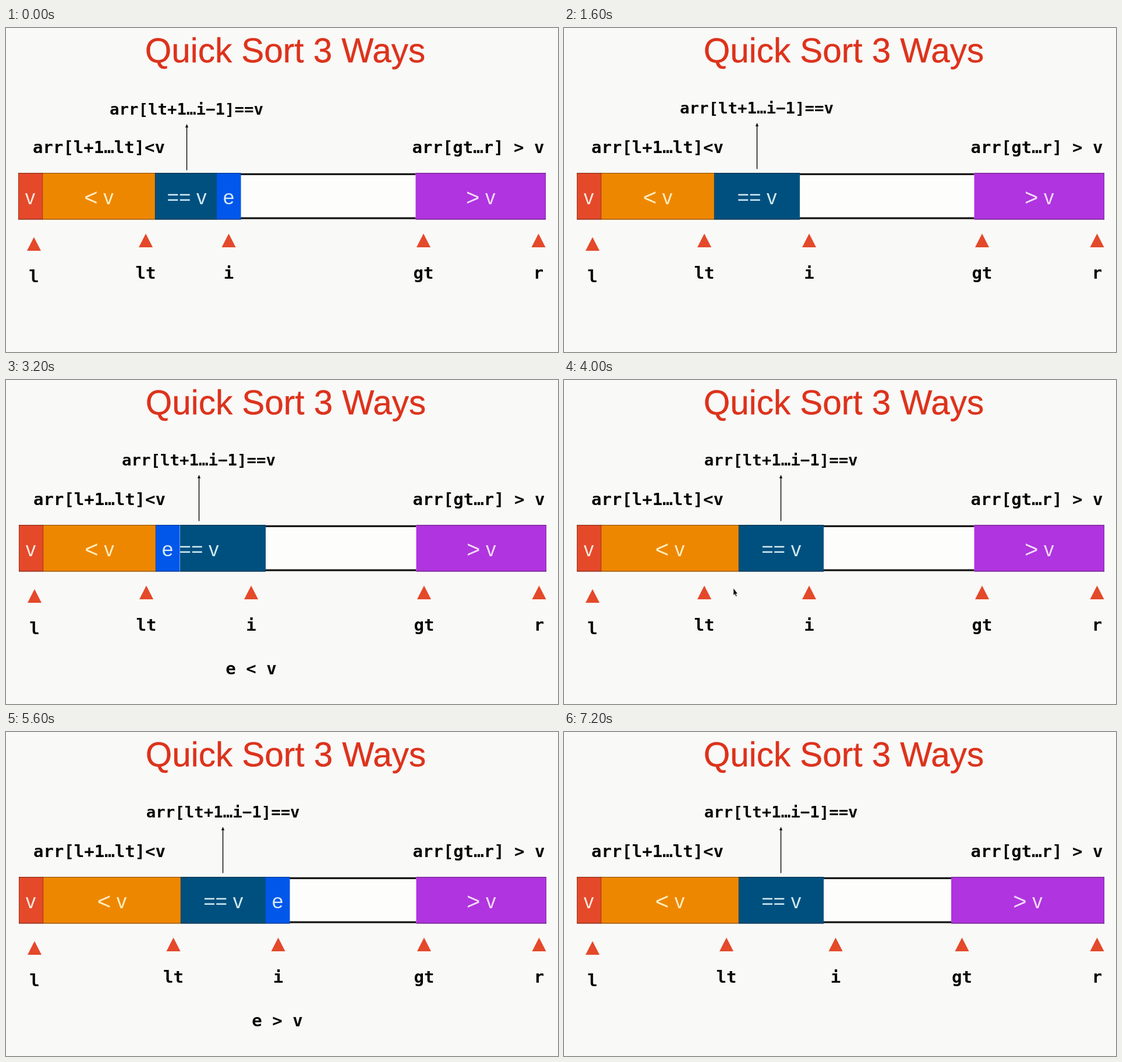
These frames come from a looping animation (948x557 px, 8000 ms). An HTML page:

```html
<!DOCTYPE html>
<html lang="en">
<head>
<meta charset="utf-8">
<title>Quick Sort 3 Ways</title>
<style>
html, body { margin: 0; width: 100%; height: 100%; overflow: hidden; background: #f9f9f7; }
svg { display: block; width: 948px; height: 557px; }
text { text-anchor: middle; white-space: pre; }
.title { font: 58.4px "Liberation Sans", Arial, sans-serif; fill: #dd321c; stroke: #dd321c; stroke-width: .4px; }
.code { font: bold 29px "DejaVu Sans Mono", monospace; fill: #060606; }
.small { font-size: 27.4px; }
.cell { font: 35px "Liberation Sans", Arial, sans-serif; }
.sign { font-size: 40px; }
</style>
</head>
<body>
<svg id="stage" viewBox="0 0 948 557"></svg>
<script>
const stage = document.getElementById("stage");
const STEP = 800;
const RED = "#e4492a", ORANGE = "#ee8700", TEAL = "#00507f", BLUE = "#0057ea", PURPLE = "#b034df";

// lt, i, gt: pointers; less, equal, more: section edges; e: left edge of the current cell
const base = { dx: 0, lt: 241, i: 383.5, gt: 718, less: 257, start: 257, equal: 363, more: 704.5,
  mid: 311, rise: 0, e: null, fill: BLUE, note: "", noteX: 0 };
const grown = { ...base, i: 421, less: 258, start: 258, equal: 405, mid: 331, rise: 2 };
const shifted = { ...grown, less: 300, start: 300, equal: 446, mid: 372.7 };
const moved = { ...shifted, lt: 287.5, i: 467.5 };
const states = [
  { ...base, dx: -1, e: 363 },
  { ...base, e: 363, fill: TEAL, note: "e == v", noteX: 384 },
  grown,
  { ...grown, e: 405, note: "e < v", noteX: 421 },
  { ...grown, less: 257, start: 299, equal: 446, e: 257, note: "e < v", noteX: 421 },
  { ...shifted, cursor: true },
  moved,
  { ...moved, e: 446, note: "e > v", noteX: 466 },
  { ...moved, e: 663.5, note: "e > v", noteX: 466 },
  { ...moved, lt: 279, i: 466.5, gt: 683.5, more: 665 }
];

const rect = (x1, x2, y, h, fill) =>
  `<rect x="${x1}" y="${y}" width="${x2 - x1}" height="${h}" fill="${fill}"/>`;
const escape = s => s.replace(/</g, "&lt;").replace(/>/g, "&gt;");
const text = (s, x, y, cls) => `<text x="${x}" y="${y}" class="${cls}">${escape(s)}</text>`;
const block = (x1, x2, fill) =>
  rect(x1, x2, 249, 80.5, fill) +
  `<path d="M${x1} 249.6H${x2}M${x1} 328.8H${x2}" stroke="#000" stroke-opacity=".35" stroke-width="1.4"/>`;
const label = (s, x, color) => `<text x="${x}" y="303" class="cell" fill="${color}">` +
  escape(s).replace(/&[lg]t;/, '<tspan class="sign" dy="2">$&</tspan><tspan dy="-2"> </tspan>').replace("</tspan> v", "</tspan>v") +
  "</text>";
const pointer = (s, x, drop = 0) =>
  `<path d="M${x} ${353.5 + drop}l12 23.4h-24z" fill="${RED}"/>` + text(s, x, 430.7 + drop, "code");

function arrow(mid, rise) {
  const x = Math.floor(mid) + .5, y = 166 - rise;
  return `<path d="M${x} ${244.5 - rise}V${y + 2}" stroke="#111" stroke-width="1.5"/>` +
    `<path d="M${x} ${y - 1}l2.6 6h-5.2z" fill="#111"/>`;
}

function bar(s) {
  let out = rect(s.equal, s.more, 249.5, 79, "#fdfdfc") +
    rect(s.equal, s.more, 249.7, 3.2, "#111") + rect(s.equal, s.more, 325.4, 3.2, "#111") +
    block(22, 64, RED) + block(64, s.less, ORANGE) + block(s.start, s.equal, TEAL) +
    block(s.more, 928, PURPLE);
  if (s.e !== null) out += block(s.e, s.e + 41.5, s.fill);
  out += `<path d="M22.5 249V329M63.8 249V329M${s.less} 249V329M927.5 249V329" stroke="#000" stroke-opacity=".3"/>`;
  out += label("v", 42.5, "#fbe6dc") + label("< v", (64 + s.less) / 2, "#fbeec0") +
    label("== v", s.mid + .5, "#cfeaf2") + label("> v", (s.more + 928) / 2, "#f3dcfa");
  if (s.e !== null) out += label("e", s.e + 20.5, "#d4ebfa");
  return out;
}

function scene(s) {
  return `<g transform="translate(${s.dx})">` +
    text("Quick Sort 3 Ways", 480.5, 58.5, "title") +
    text("arr[lt+1…i−1]==v", s.mid, 149.2 - s.rise, "code small") +
    text("arr[l+1…lt]<v", 160.5, 215, "code") +
    text("arr[gt…r] > v", 812, 215, "code") +
    arrow(s.mid, s.rise) + bar(s) +
    pointer("l", 49, 6) + pointer("lt", s.lt) + pointer("i", s.i) +
    pointer("gt", s.gt) + pointer("r", 915.5) +
    (s.note && text(s.note, s.noteX, 506, "code")) +
    (s.cursor ? '<path d="M291 358v12l2.4-2 1.8 4 1.8-.8-1.8-3.8 3-.2z" fill="#111" stroke="#ddd" stroke-width=".5"/>' : "") +
    "</g>";
}

let shown = -1;
function draw(now) {
  const n = Math.floor(now / STEP) % states.length;
  if (n !== shown) stage.innerHTML = scene(states[shown = n]);
}

const begin = performance.now();
function tick() {
  draw(performance.now() - begin);
  requestAnimationFrame(tick);
}
tick();
</script>
</body>
</html>
```
